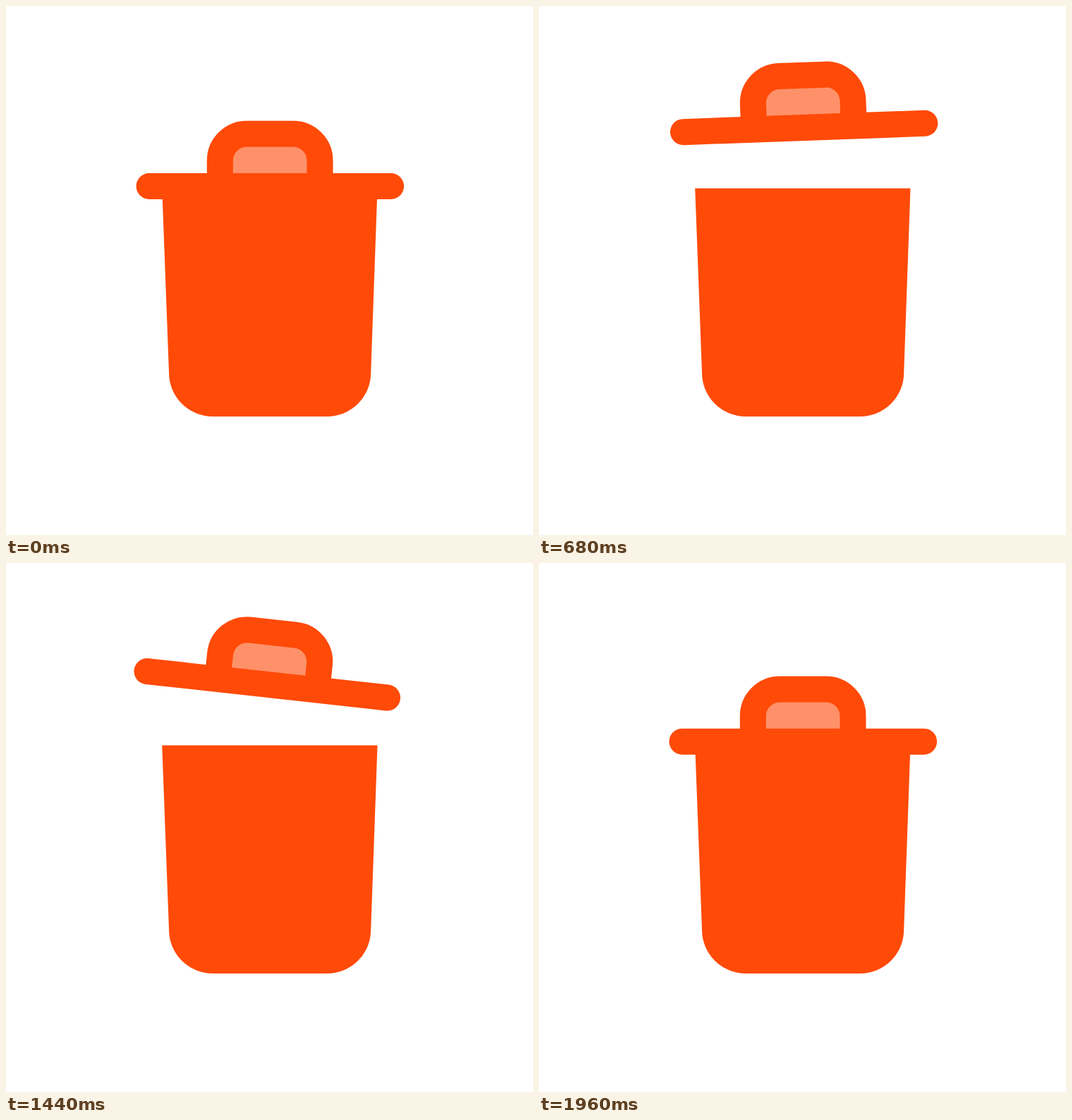
These frames come from a looping animation (747x750 px, 2000 ms). An HTML page:

```html
<!DOCTYPE html>
<html lang="en">
<head>
<meta charset="utf-8">
<title>Trash can</title>
<style>
  html, body { margin: 0; width: 100%; height: 100%; overflow: hidden; background: #fff; }
  svg { display: block; width: 100%; height: 100%; }
</style>
</head>
<body>
<svg viewBox="0 0 747 750">
  <path fill="#ff4a08" d="M221.2 258.5H526.5L517.2 520A62 62 0 0 1 455.2 582H293A62 62 0 0 1 231 520Z"/>
  <g id="lid" fill="none" stroke="#ff4a08" stroke-width="37">
    <path fill="#ff916a" d="M303.3 255.5V219.3A38 38 0 0 1 341.3 181.3H407A38 38 0 0 1 445 219.3V255.5"/>
    <path stroke-linecap="round" d="M203 255.5H545.6"/>
  </g>
</svg>
<script>
const LOOP = 2000, STEP = 40, LIFT = 83, TILT = 7;
const lid = document.getElementById('lid');

// Smooth progress from 0 to 1 between two times
const ease = (t, start, end) => {
  const s = Math.min(1, Math.max(0, (t - start) / (end - start)));
  return s * s * (3 - 2 * s);
};

// One wobble of 600 ms: left, right, back to level
const wobble = t => TILT * (-ease(t, 0, 200) + 2 * ease(t, 200, 400) - ease(t, 400, 600));

function draw(now) {
  const t = Math.floor(now % LOOP / STEP) * STEP;
  const lift = LIFT * (ease(t, 0, 400) - ease(t, 1600, 2000));
  const angle = t > 400 && t < 1600 ? wobble((t - 400) % 600) : 0;
  lid.setAttribute('transform', `translate(0 ${-lift}) rotate(${angle} 374.3 218.3)`);
  requestAnimationFrame(() => draw(performance.now()));
}
draw(performance.now());
</script>
</body>
</html>
```
